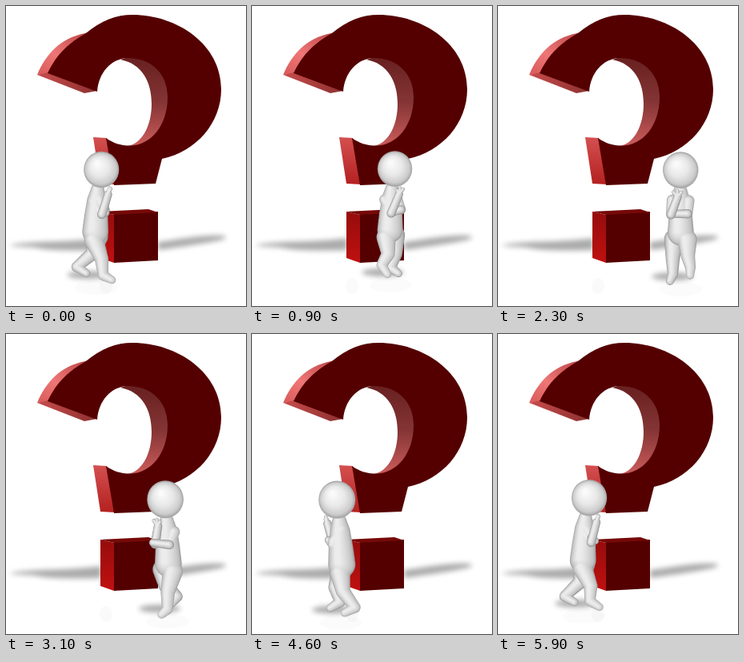
These frames come from a looping animation (300x375 px, 6 s). An HTML page with a canvas:

```html
<!DOCTYPE html>
<html lang="en">
<head>
<meta charset="utf-8">
<title>Thinker pacing around a question mark</title>
<style>
  html, body { margin: 0; width: 100%; height: 100%; overflow: hidden; background: #fff; }
  svg, canvas { position: absolute; left: 0; top: 0; width: 300px; height: 375px; }
</style>
</head>
<body>
<svg viewBox="0 0 300 375">
  <defs>
    <filter id="soft" x="-20%" y="-80%" width="140%" height="260%"><feGaussianBlur stdDeviation="3"/></filter>
    <linearGradient id="rim" x1="0" y1="1" x2="1" y2="0">
      <stop offset="0" stop-color="#d85a5a"/><stop offset=".4" stop-color="#ee7676"/><stop offset="1" stop-color="#b84040"/>
    </linearGradient>
    <linearGradient id="under"><stop offset="0" stop-color="#c84c4c"/><stop offset="1" stop-color="#8c3030"/></linearGradient>
    <linearGradient id="inner" x1="0" y1="0" x2="0" y2="1">
      <stop offset="0" stop-color="#682020"/><stop offset=".5" stop-color="#843434"/><stop offset="1" stop-color="#cc5c5c"/>
    </linearGradient>
    <linearGradient id="side" x1="0" y1="0" x2="0" y2="1">
      <stop offset="0" stop-color="#d45050"/><stop offset="1" stop-color="#b42020"/>
    </linearGradient>
    <linearGradient id="cubeSide" x1="0" y1="0" x2="0" y2="1">
      <stop offset="0" stop-color="#960c0c"/><stop offset="1" stop-color="#c01010"/>
    </linearGradient>
  </defs>
  <g filter="url(#soft)" fill="#777" opacity=".62">
    <path d="M4 299C30 293 80 296 119 290V305C95 306 60 306 42 303C30 300 15 302 4 299Z"/>
    <path d="M190 295C215 292 245 285 270 287C292 291 240 298 190 305Z"/>
  </g>
  <ellipse cx="125" cy="350" rx="8" ry="10" fill="#fafafa"/>
  <path fill="url(#rim)" d="M39 86C50 60 68 40 99 34L108 31L56 84Z"/>
  <path fill="url(#under)" d="M39 86L53 83L114 106L98 109Z"/>
  <path fill="url(#inner)" d="M143 67L152 64C184 64 203 85 203 114C203 150 180 177 152 175C170 172 182 150 182 122C182 95 170 72 143 67Z"/>
  <path fill="url(#side)" d="M109 164L126 165L136 223L118 222Z"/>
  <g fill="#540000">
    <path d="M52 84C64 59 79 46 100 34C119 18 138 11 158 11C214 11 269 48 269 104C269 146 238 182 195 191L187 222L135 224L125 165C135 172 143 174 152 174.500C180 176 202 150 202 114C202 85 182 65 152 65C131 66 116 83 114 107Z"/>
    <path d="M135 260L190 257V318L135 321Z"/>
  </g>
  <path fill="#760808" d="M118 257L178 254L190 258L135 261Z"/>
  <path fill="url(#cubeSide)" d="M118 257L135 261V321L118 315Z"/>
</svg>
<canvas id="stage" width="300" height="375"></canvas>
<script>
const ctx = document.getElementById('stage').getContext('2d');
const LOOP = 6000, FRAME = 100, STRIDES = 5, TAU = 2 * Math.PI;

// One lap around the mark: sideways sway, distance and heading follow the lap angle
function poseAt(t) {
  const lap = TAU * (t - 661) / LOOP;
  const away = Math.cos(lap - .35);
  const heading = lap + .78 * Math.cos(lap) - .44 * Math.sin(2 * lap);
  const headX = 162 + 67 * Math.sin(lap);
  return {
    headX,
    bodyX: headX - 1 - 6 * Math.cos(heading),
    headY: 205.5 - 2 * away,
    ground: 346.5 - 6.5 * away,
    heading,
    stride: TAU * STRIDES * t / LOOP
  };
}

// Chains of balls [x, y, radius], shaded together so that they blend
function drawChains(chains, dark = 165) {
  const layers = 10;
  for (let l = 0; l < layers; l++) {
    const q = l / (layers - 1), k = 1 - .8 * q;
    const tone = Math.round(dark + (236 - dark) * Math.pow(q, .5));
    ctx.fillStyle = `rgb(${tone},${tone},${tone})`;
    ctx.beginPath();
    for (const chain of chains) {
      for (let j = 1; j < chain.length; j++) {
        const a = chain[j - 1], b = chain[j];
        for (let s = 0; s <= 16; s++) {
          const [x, y, r] = a.map((v, c) => v + (b[c] - v) * s / 16);
          const cx = x - r * .3 * q, cy = y - r * .15 * q;
          ctx.moveTo(cx + r * k, cy);
          ctx.arc(cx, cy, r * k, 0, TAU);
        }
      }
    }
    ctx.fill();
  }
}

function drawHead(x, y, r) {
  const g = ctx.createRadialGradient(x - r * .25, y - r * .35, r * .1, x, y, r);
  [[0, '#fafafa'], [.5, '#e8e8e8'], [.85, '#cccccc'], [1, '#a4a4a4']].forEach(s => g.addColorStop(...s));
  ctx.fillStyle = g;
  ctx.beginPath();
  ctx.ellipse(x, y, r, r * 1.03, 0, 0, TAU);
  ctx.fill();
}

function drawBlot(x, y, rx, ry, alpha, blur) {
  ctx.filter = `blur(${blur}px)`;
  ctx.fillStyle = `rgba(0,0,0,${alpha})`;
  ctx.beginPath();
  ctx.ellipse(x, y, rx, ry, 0, 0, TAU);
  ctx.fill();
  ctx.filter = 'none';
}

function drawFigure({ headX, bodyX, headY, ground, heading, stride }) {
  const scale = (ground - headY) / 136;
  const cos = Math.cos(heading), sin = Math.sin(heading);
  const depth = (fwd, side) => fwd * sin + side * cos;
  // Body space (forward, right side, height, radius) to screen
  const at = (fwd, side, h, r) => [
    bodyX + scale * (fwd * cos - side * sin),
    ground - scale * (h - .22 * depth(fwd, side)),
    r * scale
  ];

  const leg = side => {
    const phase = stride + (side > 0 ? 0 : Math.PI);
    const step = 20 * Math.cos(phase) - 8;
    const lift = 6 * Math.max(0, -Math.sin(phase)) + Math.max(0, -step) * .15;
    const s = side * 8;
    return [
      at(0, s, 52, 12),
      at(step * .5 + 4 + lift * .5, s, 29 + lift * .4, 8.5),
      at(step, s, 9 + lift, 6.5),
      at(step + 12, s * 1.2, 4.5 + lift * .3, 4.8)
    ];
  };
  const near = cos >= 0 ? 1 : -1;

  const elbows = { left: [8, -10, 85], right: [11, 10, 84] };
  const palm = [16, 1, 107];
  const upperArm = (side, elbow) => [at(0, side * 10, 99, 7), at(...elbow, 6)];
  const forearms = [
    { z: depth(12, -1), chains: [[at(...elbows.left, 5.5), at(16, 9, 86, 4.5)]] },
    { z: depth(15, 4), chains: [[at(...elbows.right, 5.5), at(...palm, 5)]] }
  ];
  for (const spread of [-1, 0, 1]) {
    forearms[1].chains.push([at(...palm, 2.5), at(18, 1 + 5 * spread, 115 - 2 * Math.abs(spread), 2)]);
  }
  forearms.sort((a, b) => a.z - b.z);
  const drawForearms = front => forearms
    .filter(arm => (arm.z >= 0) === front)
    .forEach(arm => drawChains(arm.chains, 140));

  drawBlot(bodyX - 10, ground - 7, 26, 5, .32, 3);
  drawBlot(bodyX, ground + 9, 27, 9, .015, 0);
  drawForearms(false);
  drawChains([leg(-near)], 150);
  drawChains([
    [at(2, 0, 112, 8), at(1, 0, 98, 12), at(0, 0, 78, 14.5), at(-1, 0, 60, 16)],
    upperArm(-1, elbows.left),
    upperArm(1, elbows.right),
    leg(near)
  ]);
  drawHead(headX, headY, 21.6 * scale);
  drawForearms(true);
}

const start = performance.now();
function render() {
  const t = Math.floor((performance.now() - start) % LOOP / FRAME) * FRAME;
  ctx.clearRect(0, 0, 300, 375);
  drawFigure(poseAt(t));
  requestAnimationFrame(render);
}
render();
</script>
</body>
</html>
```
